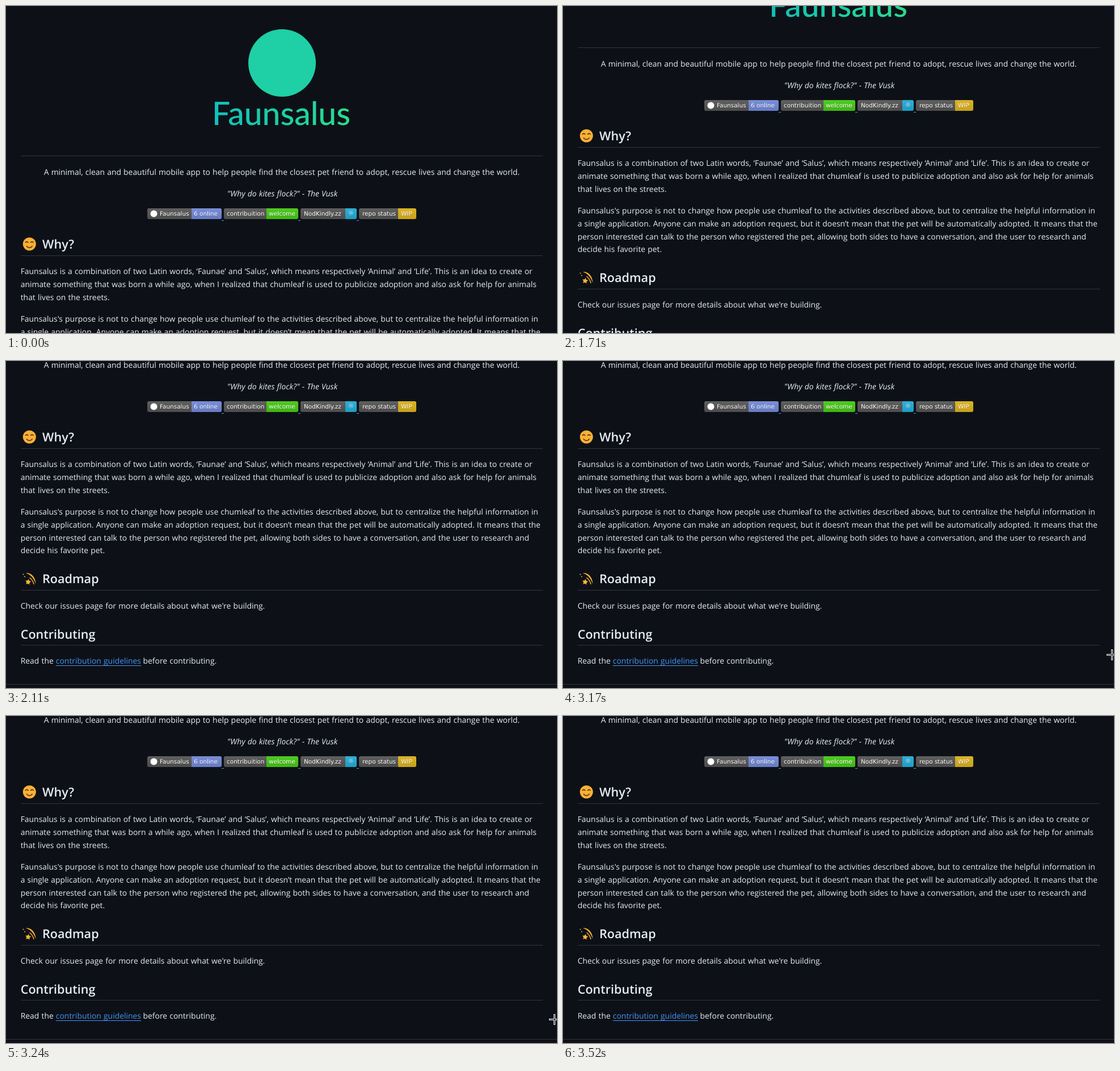
Animation, 971 px wide and 577 px high, one loop 4 s. Source, as an HTML page with a canvas:

```html
<!DOCTYPE html>
<html lang="en">
<head>
<meta charset="utf-8">
<title>Readme</title>
<style>
  html, body { margin: 0; width: 100%; height: 100%; overflow: hidden; background: #0d1117; }
  canvas { display: block; }
</style>
</head>
<body>
<canvas id="stage" width="971" height="577"></canvas>
<script>
const LOOP = 4000;
const W = 971, H = 577;
const BG = '#0d1117', INK = '#e6edf3', RULE = '#30363d', LINK = '#4493f8';
const BODY = '13.9px "Open Sans", "Noto Sans", sans-serif';
const QUOTE = 'italic ' + BODY;
const HEAD = '600 21.6px "Open Sans", "Noto Sans", sans-serif';
const BADGE = '10.48px "DejaVu Sans", sans-serif';
const SUN = 'bold 13px "DejaVu Sans", sans-serif';
const BRAND = '500 57px Lato, sans-serif';

const ctx = document.getElementById('stage').getContext('2d');
ctx.textRendering = 'geometricPrecision';

// Baseline and content of the left-aligned lines, in page coordinates.
const lines = [
  [473, 'Faunsalus is a combination of two Latin words, ‘Faunae’ and ‘Salus’, which means respectively ‘Animal’ and ‘Life’. This is an idea to create or'],
  [496, 'animate something that was born a while ago, when I realized that chumleaf is used to publicize adoption and also ask for help for animals'],
  [519, 'that lives on the streets.'],
  [557, 'Faunsalus\'s purpose is not to change how people use chumleaf to the activities described above, but to centralize the helpful information in'],
  [580, 'a single application. Anyone can make an adoption request, but it doesn’t mean that the pet will be automatically adopted. It means that the'],
  [603, 'person interested can talk to the person who registered the pet, allowing both sides to have a conversation, and the user to research and'],
  [625, 'decide his favorite pet.'],
  [723, 'Check our issues page for more details about what we\'re building.']
];

// x, split, right edge, colour, label and its x, value and its x
const badges = [
  [249, 327, 380, '#7289da', 'Faunsalus', 271, '6 online', 331],
  [384, 459, 515, '#44cc11', 'contribuition', 389, 'welcome', 463],
  [519, 598, 618, '#1eaedb', 'NodKindly.zz', 525, '☼', 602],
  [622, 691, 723, '#dfb317', 'repo status', 628, 'WIP', 696]
];

function text(str, x, y, font, color = INK, align = 'left') {
  ctx.font = font;
  ctx.wordSpacing = font.endsWith(BODY) ? '0.55px' : '0px';
  ctx.fillStyle = color;
  ctx.textAlign = align;
  ctx.fillText(str, x, y);
}

function rect(x, y, w, h, color) {
  ctx.fillStyle = color;
  ctx.fillRect(x, y, w, h);
}

function disc(x, y, r, color) {
  ctx.fillStyle = color;
  ctx.beginPath();
  ctx.arc(x, y, r, 0, Math.PI * 2);
  ctx.fill();
}

function rule(y) {
  rect(26, y, 920, 1, RULE);
}

function brand() {
  disc(486.5, 100.5, 59.5, '#1fcfa6');
  const g = ctx.createLinearGradient(361, 0, 609, 0);
  g.addColorStop(0, '#0fc0bd');
  g.addColorStop(1, '#2bdc8c');
  text('Faunsalus', 485, 210, BRAND, g, 'center');
}

function badge([x, split, end, color, label, lx, value, vx], i) {
  const top = 357, h = 19;
  ctx.save();
  ctx.beginPath();
  ctx.roundRect(x, top, end - x, h, 3);
  ctx.clip();
  rect(x, top, split - x, h, '#555');
  rect(split, top, end - split, h, color);
  const shade = ctx.createLinearGradient(0, top, 0, top + h);
  shade.addColorStop(0, 'rgba(187,187,187,.1)');
  shade.addColorStop(1, 'rgba(0,0,0,.1)');
  rect(x, top, end - x, h, shade);
  ctx.restore();
  for (const [str, tx] of [[label, lx], [value, vx]]) {
    const font = str === '☼' ? SUN : BADGE;
    text(str, tx, 371, font, 'rgba(1,1,1,.3)');
    text(str, tx, 370, font, '#fff');
  }
  if (i === 0) disc(260.5, 366.5, 6, '#fff');
  if (i < 3) rect(end, 378, 4, 1, LINK);
}

function smile(x, y) {
  disc(x, y, 11.5, '#fcb035');
  ctx.strokeStyle = '#4a3420';
  ctx.lineWidth = 1.6;
  ctx.lineCap = 'round';
  const arc = (cx, cy, r, a, b) => {
    ctx.beginPath();
    ctx.arc(cx, cy, r, a * Math.PI, b * Math.PI);
    ctx.stroke();
  };
  arc(x - 4.6, y - 1.6, 2.4, 1.15, 1.85);
  arc(x + 4.6, y - 1.6, 2.4, 1.15, 1.85);
  arc(x, y + 0.8, 5.6, 0.17, 0.83);
}

function dizzy(x, y) {
  ctx.fillStyle = '#fcb62d';
  ctx.beginPath();
  ctx.moveTo(x - 6, y - 10.5);
  ctx.bezierCurveTo(x + 4, y - 11, x + 11, y - 3, x + 11.5, y + 9);
  ctx.bezierCurveTo(x + 8, y - 1, x + 3, y - 7, x - 6, y - 10.5);
  ctx.fill();
  ctx.strokeStyle = '#fcb62d';
  ctx.lineWidth = 1.5;
  ctx.beginPath();
  ctx.moveTo(x + 1, y - 2);
  ctx.quadraticCurveTo(x + 6, y + 2, x + 8, y + 9);
  ctx.stroke();
  ctx.beginPath();
  for (let i = 0; i < 10; i++) {
    const a = i * Math.PI / 5 - 1.4, r = i % 2 ? 2.7 : 5.4;
    ctx.lineTo(x - 2 + r * Math.cos(a), y + 5.5 + r * Math.sin(a));
  }
  ctx.fill();
  disc(x - 10.5, y - 8, 1, '#fcb62d');
  disc(x - 8, y - 4, 1, '#fcb62d');
}

function page() {
  brand();
  rule(264);
  text('A minimal, clean and beautiful mobile app to help people find the closest pet friend to adopt, rescue lives and change the world.',
    486, 298, BODY, INK, 'center');
  text('"Why do kites flock?" - The Vusk', 487, 336, QUOTE, INK, 'center');
  badges.forEach(badge);

  smile(41.3, 420);
  text('Why?', 64, 428, HEAD);
  rule(440);
  for (const [y, str] of lines) text(str, 25.7, y, BODY);

  dizzy(41, 670.5);
  text('Roadmap', 64, 678, HEAD);
  rule(690);

  text('Contributing', 25.7, 775.5, HEAD);
  rule(787);
  let x = 25.7;
  for (const [str, color] of [['Read the ', INK], ['contribution guidelines', LINK], [' before contributing.', INK]]) {
    text(str, x, 820, BODY, color);
    const w = ctx.measureText(str).width;
    if (color === LINK) rect(x, 823, w, 1, LINK);
    x += w;
  }
  rect(0, 856, W, 1, RULE);
}

function cross(x, y) {
  rect(x - 9, y - 1, 19, 3, '#fff');
  rect(x - 1, y - 9, 3, 19, '#fff');
  rect(x - 8, y, 17, 1, '#000');
  rect(x, y - 8, 1, 17, '#000');
}

function scrollAt(t) {
  return t < 1180 ? 0 : t < 1710 ? 95 : t < 2110 ? 191 : 286;
}

function draw(t) {
  rect(0, 0, W, H, BG);
  ctx.save();
  ctx.translate(0, -scrollAt(t));
  page();
  ctx.restore();
  if (t >= 3100 && t < 3520) {
    const k = Math.floor((t - 3100) / 70);
    cross(Math.round(966 + 1.25 * (k - 2) ** 2), Math.round(502 + 16.4 * k));
  }
}

const start = performance.now();
function tick() {
  draw((performance.now() - start) % LOOP);
  requestAnimationFrame(tick);
}
tick();
</script>
</body>
</html>
```
